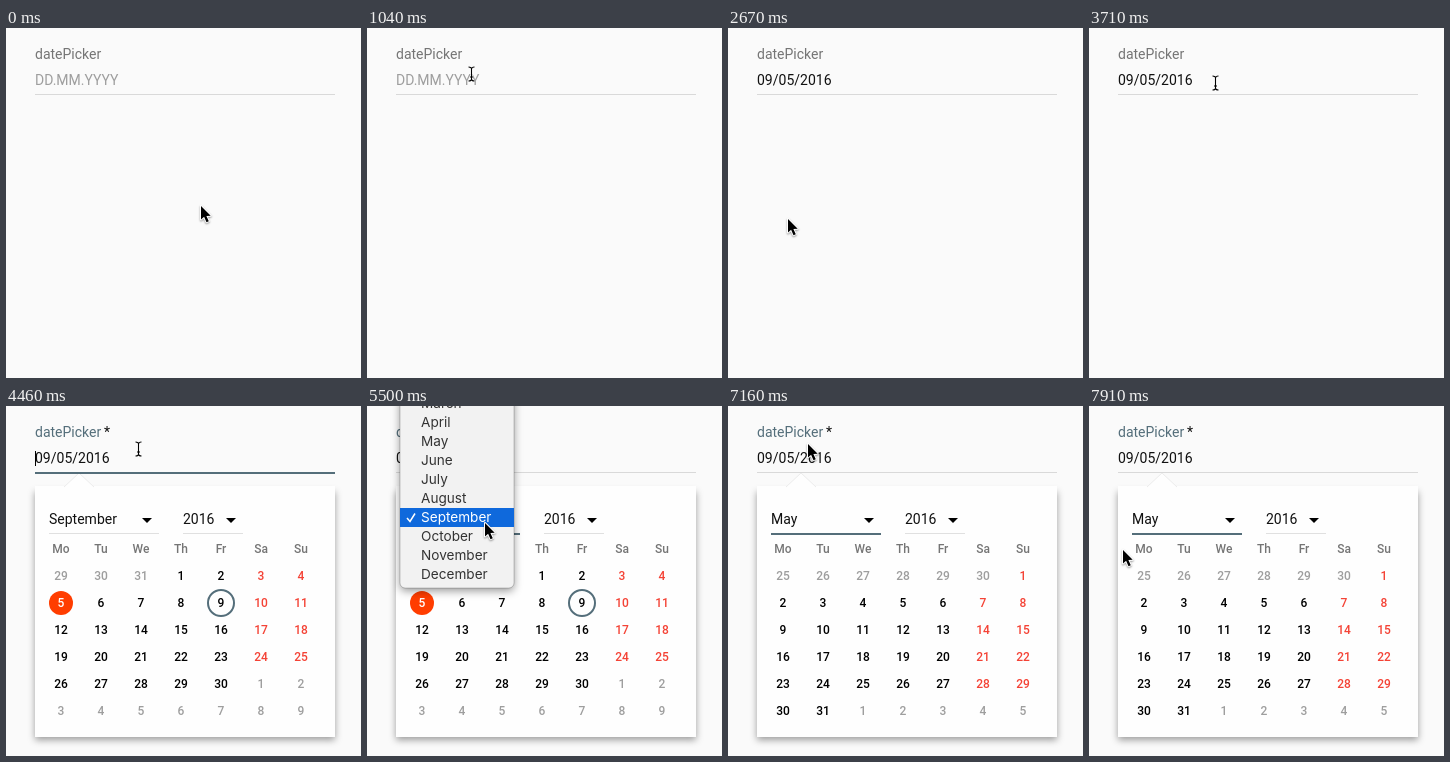
Write an HTML page with a canvas that moves like this. It is 355 px wide and 350 px high and loops after 8000 ms.

```html
<!DOCTYPE html>
<html lang="en">
<head>
<meta charset="utf-8">
<title>Date picker</title>
<style>
  html, body { margin: 0; width: 100%; height: 100%; overflow: hidden; background: #fafafa; }
  canvas { display: block; width: 355px; height: 350px; }
</style>
</head>
<body>
<canvas id="stage" width="355" height="350"></canvas>
<script>
const ctx = document.getElementById('stage').getContext('2d');
const LOOP = 8000;
const MONTHS = ['January', 'February', 'March', 'April', 'May', 'June', 'July',
  'August', 'September', 'October', 'November', 'December'];
const WEEKDAYS = ['Mo', 'Tu', 'We', 'Th', 'Fr', 'Sa', 'Su'];
const SLATE = '#546e7a', GREY = '#757575', PALE = '#9e9e9e', RED = '#f44336',
  ORANGE = '#ff3d00', RULE = '#d9d9d9', INK = '#111';
const FONT = 'Roboto, Arial, sans-serif';

// Pointer stops: time, x, y
const STOPS = [
  [0, 195, 178], [450, 190, 166], [600, 165, 120], [740, 130, 78], [890, 107, 50], [1040, 104, 46],
  [1630, 100, 62], [1780, 90, 95], [1930, 76, 130], [2070, 66, 165], [2220, 61, 185], [2370, 60, 191],
  [3420, 66, 172], [3570, 96, 115], [3710, 126, 55], [3860, 132, 43],
  [4900, 131, 52], [5050, 127, 80], [5200, 121, 105], [5350, 118, 117],
  [5650, 116, 133], [5800, 108, 161], [5950, 104, 120], [6100, 92, 62], [6240, 85, 25],
  [6390, 83, 30], [6540, 82, 33], [6680, 81, 35],
  [7160, 80, 38], [7310, 74, 55], [7460, 62, 85], [7610, 48, 115], [7760, 38, 138], [7910, 34, 144]
];
const OPEN_1 = 1330, PICK = 2670, OPEN_2 = 4460, SELECT = 5350, MENU = 5500, CHOOSE = 7160;

function text(str, x, y, color, font = '14px ' + FONT, align = 'left') {
  ctx.font = font;
  ctx.fillStyle = color;
  ctx.textAlign = align;
  ctx.fillText(str, x, y);
}

function rect(x, y, w, h, color) {
  ctx.fillStyle = color;
  ctx.fillRect(x, y, w, h);
}

function path(points, close = true) {
  ctx.beginPath();
  points.forEach(([x, y]) => ctx.lineTo(x, y));
  if (close) ctx.closePath();
}

function circle(x, y, r) {
  ctx.beginPath();
  ctx.arc(x, y, r, 0, Math.PI * 2);
}

function shadow(color, blur, dy) {
  ctx.shadowColor = color;
  ctx.shadowBlur = blur;
  ctx.shadowOffsetY = dy;
}

function drawField(value, open, focused, caret) {
  text('datePicker', 29, 31, open ? SLATE : GREY);
  if (open) text('*', 98, 31, INK);
  text(value || 'DD.MM.YYYY', 29, 57, value ? INK : PALE);
  rect(29, 66, 300, focused ? 2 : 1, focused ? SLATE : RULE);
  if (caret) rect(29, 45, 1, 15, '#000');
}

function drawSelect(label, x, width, focused) {
  text(label, x, 118, INK);
  const right = x + width - 7;
  path([[right - 10, 112], [right, 112], [right - 5, 117]]);
  ctx.fillStyle = '#000';
  ctx.fill();
  rect(x, 127, width, focused ? 2 : 1, focused ? SLATE : '#e0e0e0');
}

function drawDays(month, picked) {
  const dayFont = '500 12px ' + FONT;
  WEEKDAYS.forEach((name, i) => text(name, 55 + i * 40, 147, GREY, dayFont, 'center'));
  const lead = (new Date(2016, month, 1).getDay() + 6) % 7;
  for (let i = 0; i < 42; i++) {
    const date = new Date(2016, month, 1 - lead + i);
    const day = date.getDate(), col = i % 7;
    const x = 55 + col * 40, y = 170 + Math.floor(i / 7) * 27;
    const september = date.getMonth() === 8 && month === 8;
    let color = date.getMonth() !== month ? PALE : col > 4 ? RED : '#000';
    if (september && day === 9) {
      circle(x, y, 13);
      ctx.strokeStyle = SLATE;
      ctx.lineWidth = 2;
      ctx.stroke();
    }
    if (september && day === 5 && picked) {
      circle(x, y, 12);
      ctx.fillStyle = ORANGE;
      ctx.fill();
      color = '#fff';
    }
    text(day, x, y + 4.3, color, dayFont, 'center');
  }
}

function drawCalendar(month, picked, selecting) {
  ctx.save();
  shadow('rgba(0,0,0,.38)', 7, 3);
  rect(29, 83, 300, 248, '#fefefe');
  ctx.restore();
  rect(29, 80, 300, 10, '#fefefe');
  path([[58, 81], [73, 67], [88, 81]], false);
  ctx.fillStyle = '#fefefe';
  ctx.fill();
  ctx.strokeStyle = '#ececec';
  ctx.lineWidth = 1;
  ctx.stroke();
  drawSelect(MONTHS[month], 43, 110, selecting);
  drawSelect('2016', 177, 60, false);
  drawDays(month, picked);
}

function drawMenu(hover) {
  ctx.save();
  shadow('rgba(0,0,0,.4)', 9, 3);
  ctx.beginPath();
  ctx.roundRect(33, -20, 114, 202, 5);
  ctx.fillStyle = '#f2f2f2';
  ctx.fill();
  ctx.restore();
  ctx.strokeStyle = 'rgba(0,0,0,.2)';
  ctx.lineWidth = 1;
  ctx.stroke();
  for (let m = 2; m < 12; m++) {
    const top = 7 + (m - 3) * 19;
    const color = m === hover ? '#fff' : '#333';
    if (m === hover) rect(33, top, 114, 19, '#0f69dc');
    text(MONTHS[m], 54, top + 14, color, '13.6px Inter, sans-serif');
    if (m === 8) {
      path([[40, top + 10], [43, top + 13.5], [48, top + 5.5]], false);
      ctx.strokeStyle = color;
      ctx.lineWidth = 1.5;
      ctx.stroke();
    }
  }
}

function drawArrow(x, y) {
  ctx.save();
  ctx.translate(x, y);
  path([[0, 0], [0, 13.5], [3.1, 10.8], [5.5, 16.2], [7.8, 15.2], [5.4, 9.9], [9.7, 9.7]]);
  ctx.lineJoin = 'round';
  ctx.lineWidth = 2;
  ctx.strokeStyle = '#fff';
  shadow('rgba(0,0,0,.4)', 2, 1);
  ctx.stroke();
  ctx.shadowColor = 'transparent';
  ctx.fillStyle = '#000';
  ctx.fill();
  ctx.restore();
}

function drawBeam(x, y) {
  ctx.save();
  ctx.translate(x + 0.5, y);
  ctx.beginPath();
  for (const s of [-1, 1]) {
    ctx.moveTo(-3, 7 * s);
    ctx.quadraticCurveTo(0, 7 * s, 0, 5 * s);
    ctx.quadraticCurveTo(0, 7 * s, 3, 7 * s);
  }
  ctx.moveTo(0, -6);
  ctx.lineTo(0, 6);
  ctx.moveTo(-1.5, 3);
  ctx.lineTo(1.5, 3);
  for (const [width, color] of [[2.4, 'rgba(255,255,255,.8)'], [1.1, '#000']]) {
    ctx.lineWidth = width;
    ctx.strokeStyle = color;
    ctx.stroke();
  }
  ctx.restore();
}

function draw(t) {
  const [, x, y] = STOPS.findLast(stop => stop[0] <= t);
  const first = t >= OPEN_1 && t < PICK;
  const open = first || t >= OPEN_2;
  const focused = open && t < SELECT;
  const picked = t >= PICK;
  const menu = t >= MENU && t < CHOOSE;
  const caret = focused && (t - (first ? OPEN_1 : OPEN_2)) % 1060 < 530;

  rect(0, 0, 355, 350, '#fafafa');
  if (open) drawCalendar(t >= CHOOSE ? 4 : 8, picked, t >= SELECT);
  drawField(picked ? '09/05/2016' : '', open, focused, caret);
  if (menu) drawMenu(3 + Math.floor((y - 7) / 19));
  if (!menu && y > 41 && y < 66 && t < CHOOSE) drawBeam(x, y);
  else drawArrow(x, y);
}

function tick() {
  draw(performance.now() % LOOP);
  requestAnimationFrame(tick);
}
tick();
</script>
</body>
</html>
```
